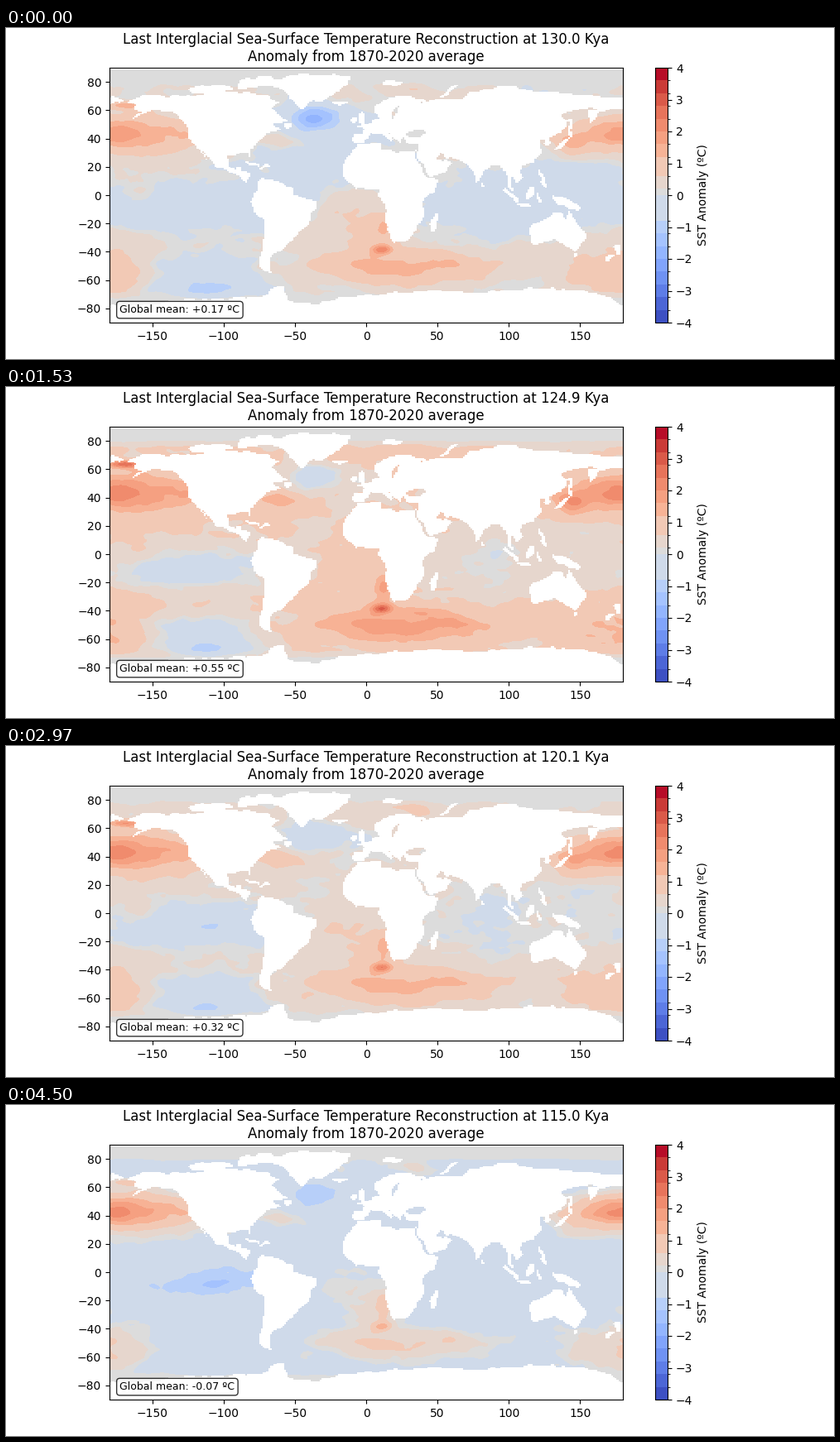
A matplotlib script for the animation above (4530 ms loop, 1000 by 400 pixels).

```python
import numpy as np
import matplotlib.pyplot as plt
from matplotlib.animation import FuncAnimation
from matplotlib.cm import ScalarMappable
from matplotlib.colors import BoundaryNorm, ListedColormap
from matplotlib.path import Path

plt.rcParams["font.family"] = "DejaVu Sans"
FRAMES, INTERVAL = 151, 30
WIDTH, HEIGHT = 620, 308

# Coastlines as flat lon, lat sequences
NORTH_AMERICA = [
    -168, 66, -156, 71, -128, 70, -105, 73, -85, 73, -70, 70, -62, 66, -65, 62, -64, 59,
    -56, 52, -66, 50, -61, 46, -70, 43, -76, 36, -81, 31, -80, 25, -83, 30, -97, 28,
    -97, 20, -91, 19, -90, 21, -87, 21, -88, 16, -83, 15, -83, 10, -77, 8, -85, 10,
    -94, 16, -105, 20, -109, 25, -114, 31, -110, 23, -117, 33, -124, 40, -125, 48,
    -136, 59, -145, 60, -152, 59, -164, 54, -157, 59, -164, 61, -161, 64]
SOUTH_AMERICA = [
    -77, 8, -72, 12, -62, 10, -51, 4, -50, 0, -35, -5, -35, -9, -39, -14, -40, -21,
    -48, -26, -53, -33, -58, -38, -65, -42, -69, -51, -66, -55, -72, -54, -75, -48,
    -71, -30, -70, -18, -76, -14, -81, -5, -77, 4]
ASIA = [
    30, 47, 30, 70, 41, 67, 36, 65, 45, 67, 68, 69, 70, 73, 87, 75, 104, 77, 113, 74,
    140, 72, 180, 69, 180, 62, 164, 60, 157, 51, 156, 59, 162, 62, 142, 59, 135, 55,
    141, 52, 140, 48, 128, 41, 129, 35, 126, 35, 125, 39, 121, 38, 122, 30, 117, 23,
    108, 21, 109, 12, 105, 9, 101, 13, 103, 2, 98, 8, 97, 16, 92, 21, 87, 21, 80, 15,
    78, 8, 73, 20, 67, 25, 57, 26, 50, 30, 51, 25, 56, 25, 59, 22, 53, 16, 44, 13,
    35, 28, 36, 36, 27, 37, 27, 41]
EUROPE = [
    30, 48, 27, 41, 23, 40, 23, 36, 14, 45, 18, 40, 16, 38, 9, 44, 3, 43, -1, 37, -9, 37,
    -9, 43, -2, 43, -1, 47, -5, 48, 8, 54, 8, 57, 5, 59, 5, 62, 15, 69, 22, 71, 31, 70]
AFRICA = [
    -6, 36, 10, 37, 11, 33, 20, 31, 34, 32, 34, 28, 37, 21, 43, 12, 51, 12, 48, 5, 40, -3,
    39, -8, 40, -15, 35, -20, 35, -24, 32, -29, 27, -34, 19, -34, 15, -27, 12, -18,
    13, -8, 9, -1, 9, 4, -4, 5, -8, 4, -13, 9, -17, 14, -16, 22, -10, 30]
AUSTRALIA = [
    114, -22, 122, -18, 131, -12, 136, -12, 139, -17, 142, -11, 146, -19, 153, -26,
    153, -31, 150, -37, 146, -39, 135, -34, 131, -31, 118, -35, 115, -34]
GREENLAND = [
    -73, 78, -58, 75, -51, 65, -44, 60, -40, 65, -23, 70, -12, 80, -12, 84, -52, 86]
ICE_LON = [-180, -158, -130, -75, -66, -58, -55, -35, -22, 0, 50, 75, 110, 140, 170, 180]
ICE_LAT = [-78, -78, -74, -72, -66, -63, -75, -77, -73, -70, -67, -69, -66, -66, -72, -78]

# Ellipses: lon, lat, half axes, tilt
ISLANDS = [
    (-78, 80, 13, 4, 10), (-110, 75, 15, 3, 0), (-19, 65, 5, 1.6, 0), (18, 79, 7, 1.5, 0),
    (58, 74, 9, 1.2, 35), (-3, 54, 2, 5, 10), (-8, 53, 2, 2, 0), (-56, 49, 3, 2, 0),
    (-80, 22, 5, 1, -15), (-71, 19, 3, 1, 0), (47, -19, 2, 7, -15), (114, 1, 3, 5, -35),
    (101, 0, 7, 1.5, -45), (110, -7, 5, 1, -8), (121, -2, 1.5, 4, 0), (123, 12, 1.6, 7, 20),
    (140, -5, 11, 3, -25), (137, 36, 7, 1.3, 40), (143, 43, 2, 1.5, 0), (143, 50, 1, 5, 0),
    (176, -38, 2, 3, 20), (170, -44, 1.5, 4, -40), (147, -42, 2, 1.5, 0),
    (81, 7, 1, 2, 0), (-179, 67, 10, 2, 0)]
INLAND_SEAS = [(34, 43.5, 7, 2.3, 0), (20, 59, 1.5, 5, -20)]

# Regional anomalies: lon, lat, lon spread, lat spread, then start, peak and end offsets
REGIONS = [
    (-158, 43, 38, 11, 1.2, 1.1, 1.8), (165, 41, 22, 8, .7, .7, 1),
    (143, 36, 8, 5, .9, 1, .2), (-62, 38, 11, 5, .6, .9, .6),
    (-35, 55, 14, 7, -1.7, -1, -.8), (-40, 25, 35, 20, -.55, -.05, 0),
    (145, 10, 25, 18, -.55, -.25, 0), (-125, -12, 38, 10, -.65, -1, -.25),
    (-100, -6, 24, 8, 0, -.15, -.65), (80, -10, 32, 14, -.55, -.5, -.05),
    (-5, -20, 22, 18, .6, .35, .55), (12, -24, 4, 7, .8, .9, 1),
    (10, -38.5, 5, 2.2, 1.5, 1.7, 1.2), (38, -40, 13, 2.5, .5, .6, .2),
    (25, -51, 45, 8, 1.2, 1.2, .9), (177, -53, 28, 14, .9, .7, .9),
    (-120, -53, 32, 7, -.6, -1, -.1), (-112, -67, 22, 4.5, -1.2, -1.5, -.4),
    (35, 73, 25, 5, .4, .5, .6), (-170, 63.5, 9, 2, 1.3, 2, 1)]
BACKGROUND = (.15, .62, -.32)

MEAN_FRAMES = [0, 9, 18, 28, 38, 51, 79, 99, 122, 150]
MEAN_VALUES = [.17, .33, .46, .53, .56, .55, .44, .32, .13, -.07]
PEAK_FRAME, PEAK_MEAN = 38, .56


def smooth_noise(rng, shape, sx, sy):
    """Unit-variance noise blurred by sx, sy cells."""
    fy = np.fft.fftfreq(shape[0])[:, None]
    fx = np.fft.fftfreq(shape[1])[None]
    blur = np.exp(-2 * np.pi ** 2 * ((fx * sx) ** 2 + (fy * sy) ** 2))
    noise = np.fft.ifft2(np.fft.fft2(rng.standard_normal(shape)) * blur).real
    return noise / noise.std()


def in_polygon(points, x, y):
    outline = Path(np.reshape(points, (-1, 2)))
    return outline.contains_points(np.column_stack([x.ravel(), y.ravel()])).reshape(x.shape)


def in_ellipse(ellipse, x, y):
    x0, y0, rx, ry, tilt = ellipse
    c, s = np.cos(np.radians(tilt)), np.sin(np.radians(tilt))
    dx, dy = (x - x0 + 180) % 360 - 180, y - y0
    return ((dx * c + dy * s) / rx) ** 2 + ((dy * c - dx * s) / ry) ** 2 < 1


def land_mask(lon, lat):
    """Rasterise roughened coastlines onto cells of 1.25 by 1 degree."""
    x, y = np.meshgrid(-179.375 + 1.25 * np.arange(288), 89.5 - np.arange(180))
    rng = np.random.default_rng(3)
    x = np.clip(x + .6 * smooth_noise(rng, x.shape, 1.5, 1.5), -179.9, 179.9)
    y = y + .5 * smooth_noise(rng, x.shape, 1.5, 1.5)
    land = y < np.interp(x, ICE_LON, ICE_LAT)
    for coast in (NORTH_AMERICA, SOUTH_AMERICA, ASIA, EUROPE, AFRICA, AUSTRALIA, GREENLAND):
        land |= in_polygon(coast, x, y)
    for island in ISLANDS:
        land |= in_ellipse(island, x, y)
    for sea in INLAND_SEAS:
        land &= ~in_ellipse(sea, x, y)
    land[0] = True
    land[168:] = True
    return land[np.ix_((90 - lat).astype(int), ((lon + 180) / 1.25).astype(int))]


def anomaly_fields(lon, lat):
    """Anomaly maps at the start, the peak and the end."""
    rng = np.random.default_rng(7)
    shape = (HEIGHT, WIDTH)
    texture = .08 * smooth_noise(rng, shape, 14, 6) + .05 * smooth_noise(rng, shape, 5, 2.5)
    fields = [base + texture for base in BACKGROUND]
    for lon0, lat0, sx, sy, *offsets in REGIONS:
        dx = (lon - lon0 + 180) % 360 - 180
        bump = np.exp(-.5 * ((lat - lat0) / sy) ** 2)[:, None] * np.exp(-.5 * (dx / sx) ** 2)
        for field, offset in zip(fields, offsets):
            field += offset * bump
    open_water = (np.clip((81 - lat) / 6, 0, 1) * np.clip((lat + 74) / 6, 0, 1))[:, None]
    return [.1 + (field - .1) * open_water for field in fields]


lon = -180 + (np.arange(WIDTH) + .5) * 360 / WIDTH
lat = 90 - (np.arange(HEIGHT) + .5) * 180 / HEIGHT
land = land_mask(lon, lat)
start, peak, end = anomaly_fields(lon, lat)

edges = np.r_[np.arange(-4, -.7, .4), 0, .2, .6, 1.2, np.arange(1.6, 4.1, .4)]
middles = (edges[:-1] + edges[1:]) / 2
colours = plt.get_cmap("coolwarm")(.5 + middles / 8 * 1.03)
colours[8:12, :3] = np.array([(207, 218, 234), (220, 220, 220),
                              (230, 214, 205), (242, 201, 181)]) / 255
cmap = ListedColormap(colours)
cmap.set_bad("white")
norm = BoundaryNorm(edges, cmap.N)

fig, ax = plt.subplots(figsize=(10, 4), dpi=100)
fig.colorbar(ScalarMappable(norm, cmap), ax=ax, label="SST Anomaly (ºC)",
             ticks=range(-4, 5), spacing="proportional")
image = ax.imshow(np.ma.array(start, mask=land), cmap=cmap, norm=norm, aspect="auto",
                  extent=(-180, 180, -90, 90), interpolation="nearest")
title = ax.set_title("")
label = ax.text(.02, .05, "", transform=ax.transAxes, fontsize=9, va="center",
                bbox=dict(boxstyle="round", facecolor="white", alpha=.8))


def update(frame):
    mean = np.interp(frame, MEAN_FRAMES, MEAN_VALUES)
    base, base_mean = (start, .17) if frame <= PEAK_FRAME else (end, -.07)
    weight = (mean - base_mean) / (PEAK_MEAN - base_mean)
    field = np.clip(base + (peak - base) * weight, -3.99, 3.99)
    image.set_data(np.ma.array(field, mask=land))
    title.set_text("Last Interglacial Sea-Surface Temperature Reconstruction at "
                   f"{130 - frame / 10:.1f} Kya\nAnomaly from 1870-2020 average")
    label.set_text(f"Global mean: {mean:+.2f} ºC")
    return image, title, label


anim = FuncAnimation(fig, update, frames=FRAMES, interval=INTERVAL, repeat=True,
                     repeat_delay=0)
plt.show()
```
